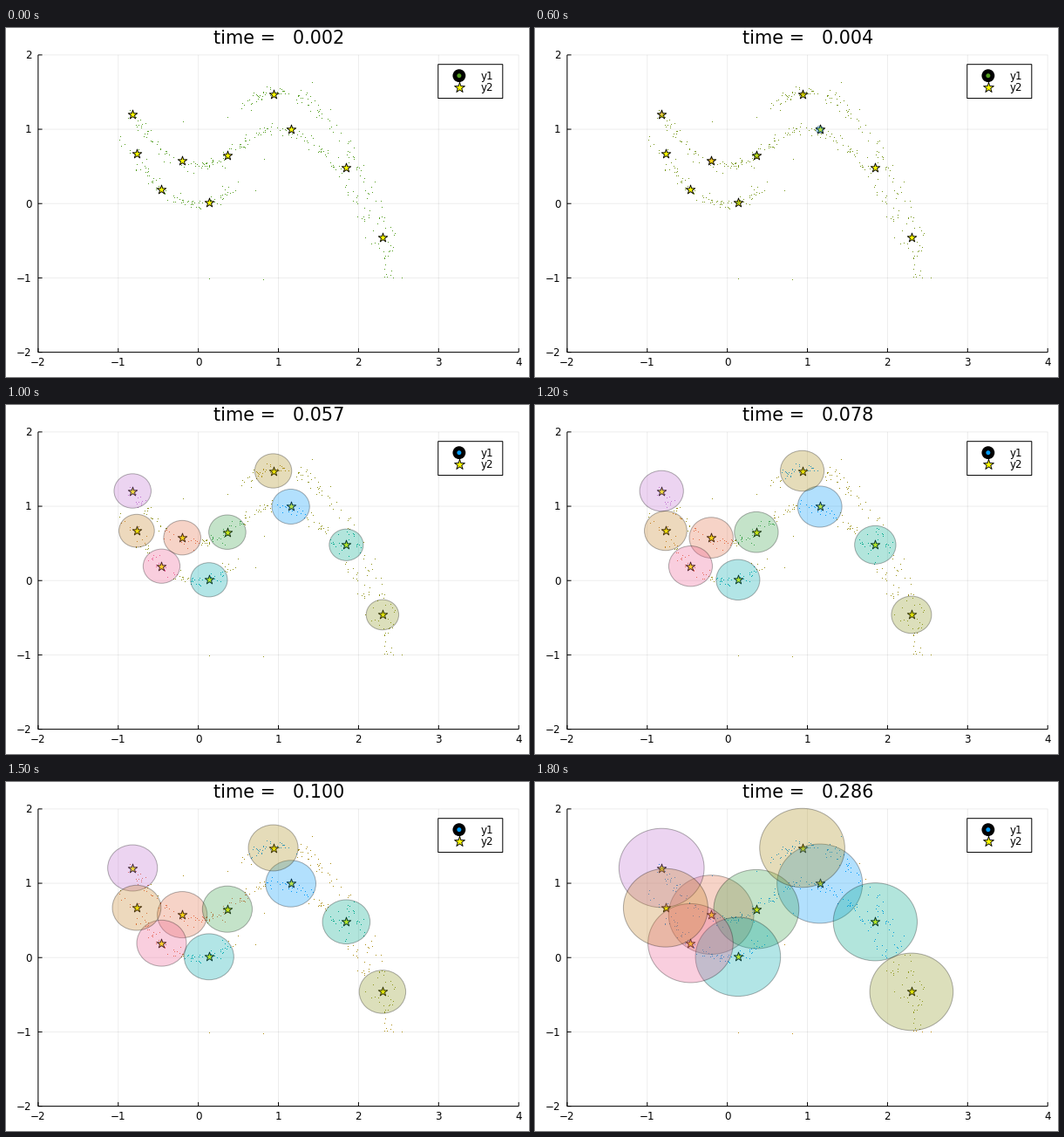
Recreate the animation shown at these times as a matplotlib script. Size 600x400 px, loop 4900 ms.

```python
from itertools import combinations

import numpy as np
import matplotlib.pyplot as plt
from matplotlib.animation import FuncAnimation
from matplotlib.patches import Circle, Ellipse, Rectangle

W, H, DPI = 600, 400, 100
PX = 72 / DPI  # points per pixel
LEFT, RIGHT, TOP, BOTTOM = 36.87, 588.19, 30.87, 371.61
SX, SY = (RIGHT - LEFT) / 6, (BOTTOM - TOP) / 4
FRAMES = 49

PALETTE = ["#009AFA", "#E36F47", "#3EA44E", "#C371D2", "#AC8E18",
           "#00AAAE", "#ED5E93", "#C68225", "#00A98D", "#8E971E"]
GREEN, GOLD = np.array([0.33, 0.62, 0.12]), np.array([0.75, 0.55, 0.08])

# Ball centres, oldest first, and the times at which they start to grow
CENTERS = np.array([(1.154, 0.995), (-0.201, 0.577), (0.362, 0.652),
                    (-0.821, 1.206), (0.935, 1.476), (0.133, 0.011),
                    (-0.459, 0.194), (-0.770, 0.670), (1.847, 0.481),
                    (2.299, -0.460)])
BIRTHS = np.r_[0.0016, np.linspace(0.003, 0.004, 6),
               np.linspace(0.0078, 0.0155, 3)]


def touch_time(i, j):
    """Time at which balls of radius sqrt(time - birth) meet."""
    gap = np.hypot(*(CENTERS[i] - CENTERS[j]))
    return BIRTHS[i] + ((gap**2 + BIRTHS[j] - BIRTHS[i]) / (2 * gap))**2


def find_merges():
    """Touches that join two clusters, as (time, older, younger)."""
    roots = np.arange(len(CENTERS))
    merges = []
    for i, j in sorted(combinations(roots, 2), key=lambda p: touch_time(*p)):
        old, young = sorted((roots[i], roots[j]))
        if old != young:
            merges.append((touch_time(i, j), old, young))
            roots[roots == young] = old
    return merges


def cluster_roots(time):
    roots = np.arange(len(CENTERS))
    for when, old, young in MERGES:
        if when < time:
            roots[roots == young] = old
    return roots


MERGES = find_merges()
TIMES = np.r_[BIRTHS, [merge[0] for merge in MERGES]]
LAST = len(TIMES) - 1


def to_px(x, y):
    return LEFT + (x + 2) * SX, BOTTOM - (y + 2) * SY


def make_points(seed=7):
    """Two pairs of noisy parabola arcs and a few stray points."""
    rng = np.random.default_rng(seed)
    parts = []
    for lift in (0, 0.5):
        x = rng.uniform(-0.93, 0.5, 90)
        parts.append(np.c_[x, x**2 + lift])
        x = rng.uniform(0.5, 2.47, 125)
        parts.append(np.c_[x, 1 - (x - 1)**2 + lift])
    cloud = np.vstack(parts)
    cloud += rng.normal(0, 0.045, cloud.shape)
    strays = rng.uniform((-0.7, -1.3), (1.6, 2), (8, 2))
    return np.vstack([cloud, strays])


def text(x, y, s, size=11.85, ha="center"):
    return ax.text(x, y, s, size=size * PX, ha=ha, va="baseline",
                   family="DejaVu Sans", color="black", zorder=8)


def line(xs, ys, **style):
    ax.plot(xs, ys, color="black", lw=PX, snap=False,
            solid_capstyle="butt", **style)


def stars(x, y, radius, z):
    ax.scatter(x, y, s=(2 * radius * PX)**2, marker="*", fc="#FFFF00",
               ec="black", lw=0.9 * PX, zorder=z)


def draw_axes():
    grid, axis = dict(alpha=0.07, zorder=0), dict(zorder=6)
    for v in range(-2, 5):
        x, _ = to_px(v, 0)
        line([x, x], [TOP, BOTTOM], **grid)
        line([x, x], [BOTTOM, BOTTOM - 4.7], **axis)
        text(x, 387.2, str(v).replace("-", "\u2212"))
    for v in range(-2, 3):
        _, y = to_px(0, v)
        line([LEFT, RIGHT], [y, y], **grid)
        line([LEFT, LEFT + 4.7], [y, y], **axis)
        text(29.5, y + 4.3, str(v).replace("-", "\u2212"), ha="right")
    line([LEFT, RIGHT], [BOTTOM, BOTTOM], **axis)
    line([LEFT, LEFT], [TOP, BOTTOM], **axis)


def draw_legend(x=495.76, y=41.7, width=74.05, row=12.96):
    ax.add_patch(Rectangle((x, y), width, 3 * row, fc="white", ec="black",
                           lw=PX, zorder=7, snap=False))
    spot = (x + 24.1, y + row)
    ax.add_patch(Circle(spot, 7.4, color="black", lw=0, zorder=8))
    dot = ax.add_patch(Circle(spot, 2.5, lw=0, zorder=9))
    stars(x + 24.1, y + 2 * row, 6.2, 8)
    for i in (1, 2):
        text(x + 48.5, y + i * row + 4.3, f"y{i}", ha="left")
    return dot


fig = plt.figure(figsize=(W / DPI, H / DPI), dpi=DPI, facecolor="white")
ax = fig.add_axes([0, 0, 1, 1])
ax.set(xlim=(0, W), ylim=(H, 0))
ax.axis("off")

draw_axes()
legend_dot = draw_legend()
title = text(313, 18.15, "", size=20.74)

points = make_points()
offsets = points[:, None] - CENTERS
distances = np.hypot(offsets[..., 0], offsets[..., 1])
nearest = distances.argmin(axis=1)
nearest_distance = distances.min(axis=1)
dot_x, dot_y = np.floor(to_px(*points.T)) + 0.5
dots = ax.scatter(dot_x, dot_y, s=PX**2, marker=",", lw=0, zorder=2,
                  antialiased=False)
stars(*to_px(*CENTERS.T), 5.5, 3)

balls = []
for center, color in zip(CENTERS, PALETTE):
    spot = to_px(*center)
    balls.append([
        ax.add_patch(Ellipse(spot, 0, 0, fc=color, alpha=0.3, lw=0, zorder=4)),
        ax.add_patch(Ellipse(spot, 0, 0, fill=False, ec="black", alpha=0.3,
                             lw=PX, zorder=4))])


def update(frame):
    step = min(frame, LAST)
    time = TIMES[step]
    title.set_text(f"time =   {time:.3f}")
    radii = np.sqrt(np.maximum(0, time - BIRTHS))
    for ball, r in zip(balls, radii):
        for patch in ball:
            patch.set(width=2 * r * SX, height=2 * r * SY, visible=r > 0)

    roots = cluster_roots(time)
    loose = tuple(GREEN + (GOLD - GREEN) * step / LAST)
    inside = nearest_distance < radii[nearest]
    dots.set_facecolor([PALETTE[roots[n]] if hit else loose
                        for n, hit in zip(nearest, inside)])
    all_born = step >= len(BIRTHS)
    legend_dot.set_facecolor(PALETTE[0] if all_born else tuple(GREEN))
    return []


animation = FuncAnimation(fig, update, frames=FRAMES, interval=100,
                          repeat=True, repeat_delay=0, blit=False)
plt.show()
```
